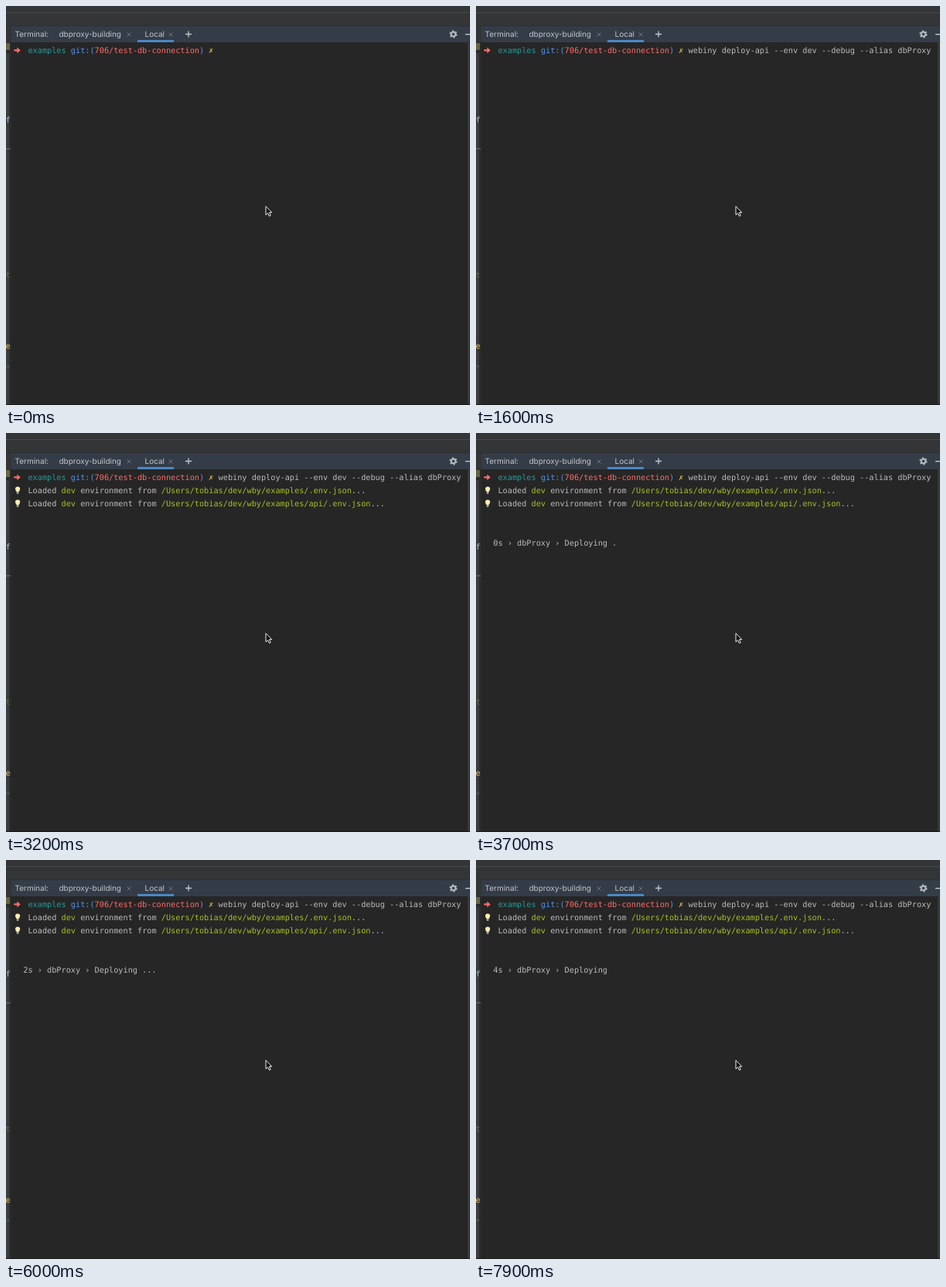
Animation of 600x517 px, one loop 8000 ms. Source, as an HTML page:

```html
<!DOCTYPE html>
<html lang="en">
<head>
<meta charset="utf-8">
<title>Terminal deploy</title>
<style>
  html, body { margin: 0; width: 100%; height: 100%; overflow: hidden; background: #262626; }
  svg { display: block; width: 100vw; height: 100vh; }
  text { white-space: pre; text-rendering: geometricPrecision; }
  .term { font: 10.22px "DejaVu Sans Mono", monospace; fill: #bbb; }
  .tabs { font: 10px Inter, sans-serif; fill: #c3c6ca; }
  .cyan { fill: #299999; }
  .blue { fill: #5394ec; }
  .red { fill: #ff6b68; }
  .yellow { fill: #d6bf55; }
  .lime { fill: #a8c023; }
</style>
</head>
<body>
<svg viewBox="0 0 600 517" preserveAspectRatio="none">
  <defs>
    <path id="close" d="M-2.5-2.5l5 5m0-5l-5 5" stroke="#6d747c" fill="none"/>
    <g id="bulb">
      <path d="M12 72.600a3.100 3.100 0 1 1 6.200 0q0 1.500-1.500 3.400h-3.200q-1.500-1.900-1.500-3.400z" fill="#fbeeb0"/>
      <path d="M13.700 76h2.800v2.300l-.7.700h-1.400l-.7-.7z" fill="#a5a59c"/>
    </g>
  </defs>

  <rect width="600" height="517" fill="#262626"/>

  <!-- toolbar and tab strip -->
  <rect width="600" height="26" fill="#333537"/>
  <rect y="8" width="600" height="1" fill="#47494b"/>
  <rect y="25" width="600" height="1" fill="#2c2e30"/>
  <rect x="7" y="26" width="593" height="21" fill="#343c48"/>
  <rect x="170" y="44" width="47" height="3" fill="#4a88c7"/>
  <g class="tabs">
    <text x="11.500" y="40">Terminal:</text>
    <text x="68.500" y="40">dbproxy-building</text>
    <text x="179.500" y="40">Local</text>
  </g>
  <use href="#close" x="159" y="37"/>
  <use href="#close" x="213" y="37"/>
  <path d="M232 36.500h8m-4-4v8" stroke="#c3c6ca" stroke-width="1.300"/>
  <path d="M594 36.700h6" stroke="#c3c6ca" stroke-width="1.400"/>
  <g fill="none" stroke="#b4b8bd">
    <circle cx="578.500" cy="36.500" r="2.800" stroke-width="2"/>
    <circle cx="578.500" cy="36.500" r="4.300" stroke-width="1.600" stroke-dasharray="2.250 2.250"/>
  </g>

  <!-- neighbouring editor edges -->
  <rect y="26" width="7" height="491" fill="#2b2b2b"/>
  <rect y="26" width="7" height="21" fill="#333537"/>
  <rect y="48" width="5" height="9" fill="#65653f"/>
  <rect y="61" width="4" height="456" fill="#3a3c3e"/>
  <rect x="597" y="47" width="3" height="470" fill="#393a37"/>
  <rect y="516" width="600" height="1" fill="#191a1b"/>
  <g class="term">
    <text x="-.5" y="151" fill="#a9b7c6">f</text>
    <rect y="184.500" width="6" height="1" fill="#777"/>
    <text x="-.5" y="352" style="fill:#62703c">t</text>
    <text x="-.5" y="444" style="fill:#e6bd62">e</text>
    <text x="-.5" y="473" style="fill:#5f7350">"</text>
  </g>

  <!-- terminal -->
  <path d="M10.300 56.200h4v-2.700l4.500 3.900-4.500 3.900v-2.700h-4z" fill="#ff6b68"/>
  <g class="term">
    <text x="28.460" y="61"><tspan class="cyan">examples </tspan><tspan class="blue">git:(</tspan><tspan class="red">706/test-db-connection</tspan><tspan class="blue">)</tspan></text>
    <text x="262" y="61" class="yellow">✗</text>
    <text id="command" x="274.580" y="61"></text>
    <g id="loaded">
      <use href="#bulb"/>
      <use href="#bulb" y="17"/>
      <text x="28.460" y="78">Loaded <tspan class="lime">dev</tspan> environment from <tspan class="lime">/Users/tobias/dev/wby/examples/.env.json</tspan>...</text>
      <text x="28.460" y="95">Loaded <tspan class="lime">dev</tspan> environment from <tspan class="lime">/Users/tobias/dev/wby/examples/api/.env.json</tspan>...</text>
    </g>
    <text id="status" x="22.300" y="146"></text>
  </g>
  <rect id="cursor" width="6.150" height="17" fill="#bbb"/>

  <path d="M336 259.500v11.200l2.600-2.400 1.700 4 1.900-.8-1.700-3.900h3.300z" fill="#111" stroke="#eee" stroke-width="1" stroke-linejoin="round"/>
</svg>
<script>
  const LOOP = 8000, CELL = 6.153, LEFT = 10, TOP = 47, ROW = 17;
  const ENTER = 2400, LOADED = 3200, DEPLOY = 3700;
  const LINE = "webiny deploy-api --env dev --debug --alias dbProxy";
  const byId = id => document.getElementById(id);
  const command = byId("command"), loaded = byId("loaded");
  const status = byId("status"), cursor = byId("cursor");
  const show = (el, on) => el.setAttribute("visibility", on ? "visible" : "hidden");
  const write = (el, s) => { if (el.textContent !== s) el.textContent = s; };

  // Two keys per tick, then the shell history completes the line.
  function typedCount(t) {
    if (t < 100) return 0;
    if (t >= 800) return LINE.length;
    return Math.min(11, Math.floor(t / 100) * 2 - 1);
  }

  function cursorOn(t) {
    if (t < 100) return false;
    if (t < ENTER) return t < 1400 || t >= 1900;
    return t < 2900;
  }

  function statusText(t) {
    if (t < DEPLOY) return "";
    const tick = Math.floor((t - DEPLOY) / 100) % 9;
    const dots = tick < 6 ? ".".repeat(1 + Math.floor(tick / 2)) : "";
    return `${Math.floor((t - DEPLOY) / 1000)}s › dbProxy › Deploying ${dots}`;
  }

  function draw() {
    const t = performance.now() % LOOP;
    const typed = typedCount(t), entered = t >= ENTER;
    write(command, LINE.slice(0, typed));
    write(status, statusText(t));
    show(loaded, t >= LOADED);
    show(cursor, cursorOn(t));
    cursor.setAttribute("x", LEFT + (entered ? 0 : (43 + typed) * CELL));
    cursor.setAttribute("y", TOP + (entered ? ROW : 0));
    requestAnimationFrame(draw);
  }
  draw();
</script>
</body>
</html>
```
